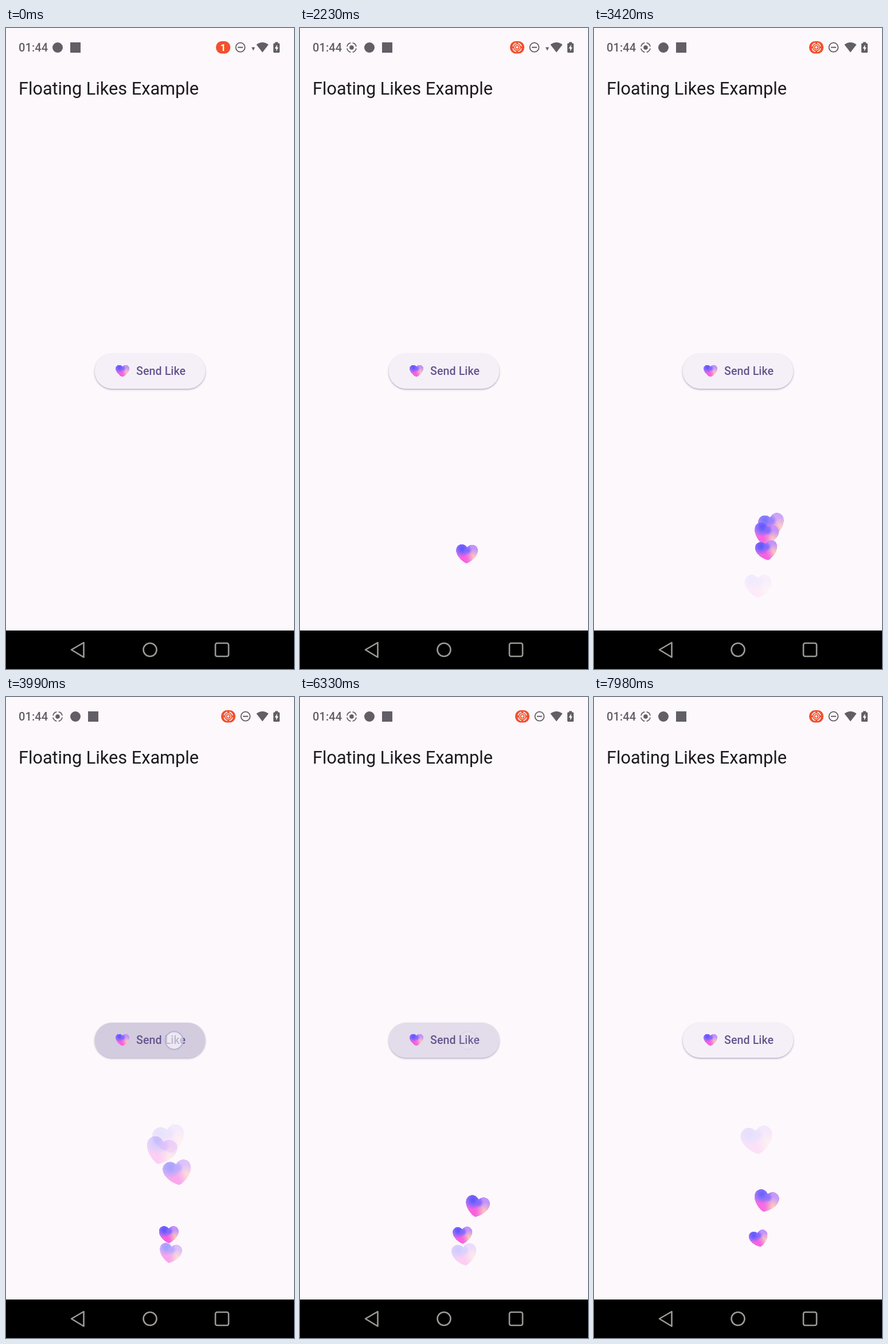
An HTML page with a canvas that plays this animation: 502x1116 px, repeating every 8000 ms.

```html
<!DOCTYPE html>
<html lang="en">
<head>
<meta charset="utf-8">
<title>Floating likes</title>
<style>
  html, body { margin: 0; width: 100%; height: 100%; overflow: hidden; background: #fdf8fc; }
  canvas { display: block; width: 502px; height: 1116px; }
</style>
</head>
<body>
<canvas id="stage" width="502" height="1116"></canvas>
<script>
const LOOP = 8000;
const LIFE = 1850;
const GOLDEN_ANGLE = 2.4;
const BACKGROUND = '#fdf8fc';
const GRAY = '#625e66';
const TAPS = [1450, 2260, 2372, 2592, 3400, 3850, 4312, 5324, 5752, 6260, 6907, 7466];
const ctx = document.getElementById('stage').getContext('2d');

const clamp = v => Math.min(1, Math.max(0, v));
const ramp = (t, from, to) => clamp((t - from) / (to - from));

function paint(path, fill, stroke, width = 2) {
  if (fill) { ctx.fillStyle = fill; ctx.fill(path); }
  if (stroke) { ctx.strokeStyle = stroke; ctx.lineWidth = width; ctx.stroke(path); }
}

function circle(x, y, r, ...style) {
  const path = new Path2D();
  path.arc(x, y, r, 0, Math.PI * 2);
  paint(path, ...style);
}

function box(x, y, w, h, r, ...style) {
  const path = new Path2D();
  path.roundRect(x, y, w, h, r);
  paint(path, ...style);
}

const shape = (data, ...style) => paint(new Path2D(data), ...style);

function label(text, x, y, size, weight, color, spacing = 0) {
  ctx.font = `${weight} ${size}px Roboto, sans-serif`;
  ctx.letterSpacing = spacing + 'px';
  ctx.fillStyle = color;
  ctx.fillText(text, x, y);
}

function withAlpha(alpha, draw) {
  if (alpha <= 0) return;
  ctx.save();
  ctx.globalAlpha = alpha;
  draw();
  ctx.restore();
}

// Glossy heart, 200 px wide, built from soft colour spots
const heartSprite = (() => {
  const sprite = document.createElement('canvas');
  sprite.width = sprite.height = 200;
  const g = sprite.getContext('2d');
  g.translate(100, 100);
  g.scale(2, 2);
  g.clip(new Path2D('M0 44C-14 40-50 14-50-16C-50-40-20-54 0-30C20-54 50-40 50-16C50 14 14 40 0 44Z'));
  g.fillStyle = '#cc80f3';
  g.fillRect(-50, -50, 100, 100);
  const spot = (x, y, r, color) => {
    const soft = g.createRadialGradient(x, y, 0, x, y, r);
    soft.addColorStop(0, color);
    soft.addColorStop(0.3, color + 'd8');
    soft.addColorStop(1, color + '00');
    g.fillStyle = soft;
    g.fillRect(-50, -50, 100, 100);
  };
  spot(34, -24, 46, '#c196fb');
  spot(32, 18, 42, '#ffc6b8');
  spot(-14, 26, 46, '#ff5cdc');
  spot(-22, -24, 40, '#5a58ff');
  spot(4, -16, 20, '#8268ff');
  return sprite;
})();

function heart(x, y, width, tilt = 0, alpha = 1) {
  withAlpha(alpha, () => {
    ctx.translate(x, y);
    ctx.rotate(tilt);
    ctx.drawImage(heartSprite, -width / 2, -width / 2, width, width);
  });
}

// Fades in while shrinking, then rises, sways, grows and fades out
function floatingHeart(age, index) {
  const p = age / LIFE;
  if (p < 0 || p >= 1) return;
  const enter = clamp(age / 250);
  const tilt = 0.26 * Math.sin(GOLDEN_ANGLE * (index - 4));
  const drift = index % 2 ? 20 : 2;
  const sway = -22 * p * Math.sin(Math.PI * 2.7 * p);
  const scale = 1.5 - 0.5 * enter + 0.8 * ramp(p, 0.25, 1);
  heart(286 + sway + drift * p, 972 - 225 * p ** 1.6,
    32 * scale, tilt, enter * clamp((1 - p) / 0.45));
}

function recordMark(x, y, r, dot, color, width) {
  circle(x, y, dot, color);
  for (let i = 0; i < 4; i++) {
    const middle = Math.PI / 4 + i * Math.PI / 2;
    const arc = new Path2D();
    arc.arc(x, y, r, middle - 0.58, middle + 0.58);
    paint(arc, null, color, width);
  }
}

function statusBar(t) {
  const recording = 1 - (1 - ramp(t, 70, 450)) ** 2;
  const shift = 31 * recording;
  label('01:44', 22, 41, 20, 500, GRAY, 0.1);
  withAlpha(recording, () => recordMark(90, 34, 8.2, 3.8, GRAY, 1.8));
  circle(90 + shift, 34, 9, GRAY);
  box(112 + shift, 25, 18, 18, 0, GRAY);

  const compact = t >= 3000;
  const x = compact ? 9 : 0;
  box(366 + x, 23, 25, 21.5, 10, '#f2502f');
  withAlpha(1 - recording, () => label('1', 373.5, 40, 17, 700, '#fff'));
  withAlpha(recording, () => {
    recordMark(378.5 + x, 33.7, 7.6, 2.1, '#fff', 1.3);
    circle(378.5 + x, 33.7, 4.5, null, '#fff', 1.2);
  });
  circle(408.5 + x, 33.7, 8, null, GRAY, 1.8);
  box(404 + x, 32.7, 9, 2, 0, GRAY);
  if (!compact) shape('M428 33.5H434L431 39.5Z', GRAY);
  shape('M436.5 29Q447 21 457.5 29L447 42.5Z', GRAY);
  box(466, 26.5, 11, 16.5, 1.5, GRAY);
  box(469, 24.5, 5, 3, 0.5, GRAY);
  shape('M472.5 29L468.5 35.8H471V40.5L474.8 33.8H472.5Z', BACKGROUND);
}

// Strongest response among all taps, rising and falling at the given ages
function tapResponse(t, riseFrom, riseTo, fallFrom, fallTo) {
  return Math.max(...TAPS.map(start =>
    ramp(t - start, riseFrom, riseTo) * (1 - ramp(t - start, fallFrom, fallTo))));
}

function button(t) {
  ctx.save();
  ctx.shadowColor = 'rgba(70, 55, 105, .42)';
  ctx.shadowBlur = 3;
  ctx.shadowOffsetY = 1.5;
  box(154.5, 567, 193, 61, 30.5, '#f5f0f7');
  ctx.restore();
  withAlpha(tapResponse(t, 20, 120, 250, 420),
    () => box(154.5, 567, 193, 61.5, 30.5, '#d3cbde'));
  heart(203, 596.8, 24);
  label('Send Like', 227, 604, 19.5, 500, '#64548e', 0.14);
  withAlpha(tapResponse(t, 65, 100, 250, 300),
    () => circle(293, 598, 15.5, 'rgba(255, 255, 255, .58)', '#b5b2d6', 2));
}

function navigationBar() {
  const color = '#9c9a97';
  ctx.fillStyle = '#000';
  ctx.fillRect(0, 1049, 502, 67);
  ctx.lineJoin = 'round';
  shape('M114 1082.5L135.5 1070V1095.5Z', null, color, 2.6);
  circle(251, 1082.5, 11.5, null, color, 2.6);
  box(365, 1071, 23, 23, 3, null, color, 2.6);
}

function draw(now) {
  const t = now % LOOP;
  ctx.fillStyle = BACKGROUND;
  ctx.fillRect(0, 0, 502, 1116);
  statusBar(t);
  label('Floating Likes Example', 22, 116, 30.68, 400, '#1c1a20');
  button(t);
  TAPS.forEach((start, index) => floatingHeart(t - start, index));
  navigationBar();
}

const begin = performance.now();
function tick() {
  draw(performance.now() - begin);
  requestAnimationFrame(tick);
}
tick();
</script>
</body>
</html>
```
